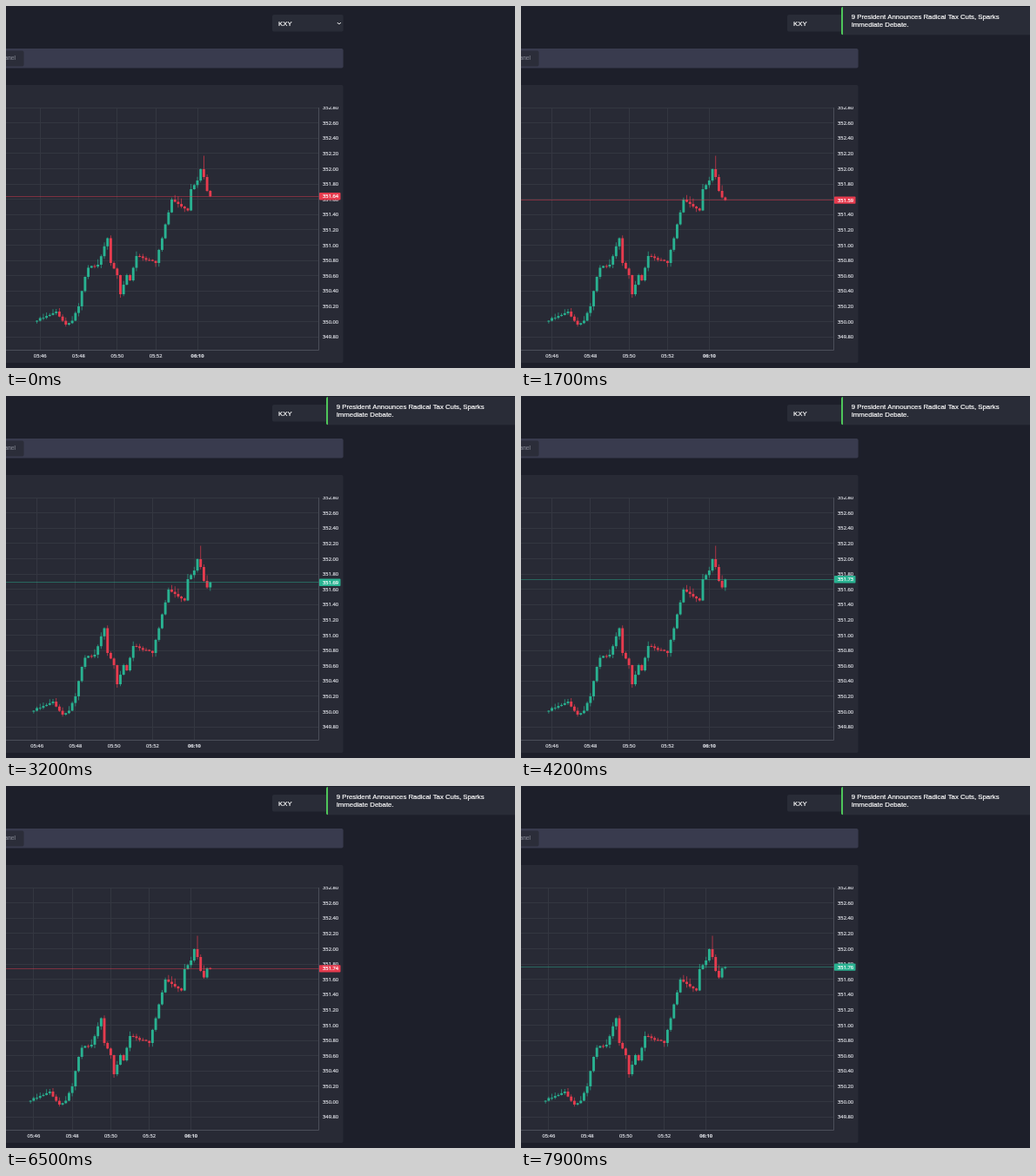
An HTML page with a canvas that plays this animation: 585 px wide and 417 px high, repeating every 8000 ms.

```html
<!DOCTYPE html>
<html lang="en">
<head>
<meta charset="utf-8">
<title>Market chart</title>
<style>
html, body { margin: 0; width: 100%; height: 100%; overflow: hidden; background: #1d1f2a; }
canvas { display: block; width: 585px; height: 417px; }
</style>
</head>
<body>
<canvas id="stage" width="585" height="417"></canvas>
<script>
const ctx = document.getElementById('stage').getContext('2d');
const LOOP = 8000;
const UP = '#29b291', DOWN = '#e63b4e', PANEL = '#292c37';
const GRID = '#343741', BORDER = '#4b4e59', LABEL = '#dcdee4';
const AXIS_FONT = '5.8px "Open Sans", "Noto Sans", sans-serif';
const UI_FONT = '7.8px "Liberation Sans", Arial, sans-serif';
const PLOT = { right: 359.5, top: 117, bottom: 396.5 };
const GAP = 3.69, LAST_X = 234.8;

// Turning points of the price curve: candle index and closing height.
const turns = [
  [-1, 363.5], [6, 352], [9, 367], [11, 362.5], [13, 346], [15, 312], [16, 301.5],
  [19, 298], [22, 267.5], [23, 296], [25, 310], [26, 332], [28, 310], [29, 316],
  [31, 288], [37, 296], [42, 223], [47, 235.5], [48, 211], [50, 201], [51, 188],
  [52, 197], [53, 213], [54, 220.5], [55, 209.8]
];
const PEAK = 52;

const quotes = [
  { at: 0, price: 351.64, i: 54 },
  { at: 600, price: 351.59, i: 55 },
  { at: 2400, price: 351.69, i: 55 },
  { at: 3700, price: 351.73, i: 55 },
  { at: 6000, price: 351.74, i: 56 },
  { at: 7200, price: 351.76, i: 56 }
];

const yOf = price => 363.5 - (price - 350) * 88;

function noise(i, seed) {
  const v = Math.sin(i * 127.1 + seed * 311.7) * 43758.5;
  return v - Math.floor(v);
}

function closeAt(i) {
  const k = turns.findIndex(turn => turn[0] >= i);
  const [i1, y1] = turns[k];
  if (i === i1) return y1;
  const [i0, y0] = turns[k - 1];
  return y0 + (y1 - y0) * (i - i0) / (i1 - i0) + (noise(i, 1) - 0.5) * 2;
}

function finishedCandle(i) {
  const open = closeAt(i - 1), close = closeAt(i);
  const wick = i === PEAK ? 15.5 : 0.5 + 6 * noise(i, 2) ** 2;
  return {
    open, close,
    high: Math.min(open, close) - wick,
    low: Math.max(open, close) + 0.5 + 4 * noise(i, 3) ** 2
  };
}

function liveCandle(seen) {
  const { i, price } = seen[seen.length - 1];
  const open = closeAt(i - 1);
  const path = [open, ...seen.filter(q => q.i === i).map(q => yOf(q.price))];
  return { open, close: yOf(price), high: Math.min(...path) - 1, low: Math.max(...path) + 1 };
}

function box(x, y, w, h, color, r = 0) {
  ctx.fillStyle = color;
  ctx.beginPath();
  ctx.roundRect(x, y, w, h, r);
  ctx.fill();
}

// A hairline outline gives small type a fuller weight.
function text(str, x, y, font, color, align = 'left') {
  ctx.font = font;
  ctx.fillStyle = ctx.strokeStyle = color;
  ctx.lineWidth = 0.2;
  ctx.textAlign = align;
  ctx.fillText(str, x, y);
  ctx.strokeText(str, x, y);
}

function line(x1, y1, x2, y2, color) {
  ctx.strokeStyle = color;
  ctx.lineWidth = 1;
  ctx.beginPath();
  ctx.moveTo(x1, y1);
  ctx.lineTo(x2, y2);
  ctx.stroke();
}

function drawPage() {
  box(0, 0, 585, 417, '#1d1f2a');
  box(306, 10, 81.7, 19.5, PANEL, 2);
  text('KXY', 313, 22.7, UI_FONT, '#fff');
  line(380.8, 19, 382.8, 21, '#fff');
  line(382.8, 21, 384.8, 19, '#fff');
  box(-5, 49, 392.6, 22.5, '#393b4e', 2);
  box(-5, 51.5, 25.5, 18, '#2b2d39', 2);
  text('Panel', 11, 62.3, UI_FONT.replace('7.8', '6.6'), '#777a86', 'right');
  box(-5, 91, 392.6, 320, '#282a35', 2);
}

function drawAxes(last) {
  for (let k = 0; k < 5; k++) {
    const latest = k === 4;
    const exact = LAST_X - (last - (latest ? 50 : 1 + k * 12)) * GAP;
    const x = Math.floor(exact) + 0.5;
    line(x, PLOT.top, x, PLOT.bottom, GRID);
    if (latest) text('06:10', exact, 405.3, 'bold ' + AXIS_FONT, LABEL, 'center');
    else text('05:' + (46 + k * 2), exact, 405.3, AXIS_FONT, LABEL, 'center');
  }

  ctx.save();
  ctx.beginPath();
  ctx.rect(0, PLOT.top - 1, 388, 290);
  ctx.clip();
  for (let k = 0; k <= 15; k++) {
    const price = 349.8 + k * 0.2;
    const y = yOf(price), row = Math.floor(y) + 0.5;
    line(0, row, PLOT.right, row, GRID);
    text(price.toFixed(2), 364, y + 2.1, AXIS_FONT, LABEL);
  }
  ctx.restore();
  line(PLOT.right, PLOT.top, PLOT.right, PLOT.bottom, BORDER);
  line(0, PLOT.bottom, PLOT.right, PLOT.bottom, BORDER);
}

const colorOf = candle => candle.close <= candle.open ? UP : DOWN;

function drawCandle(candle, x) {
  const { open, close, high, low } = candle;
  const color = colorOf(candle);
  ctx.globalAlpha = 0.75;
  box(x - 0.45, high, 0.9, low - high, color);
  ctx.globalAlpha = 1;
  box(x - 1.45, Math.min(open, close), 2.9, Math.max(1, Math.abs(open - close)), color);
}

function drawPrices(seen) {
  const { i: last, price } = seen[seen.length - 1];
  for (let i = 0; i < last; i++) {
    drawCandle(finishedCandle(i), LAST_X - (last - i) * GAP);
  }
  const live = liveCandle(seen);
  drawCandle(live, LAST_X);

  const row = Math.floor(live.close) + 0.5;
  ctx.globalAlpha = 0.45;
  line(0, row, PLOT.right, row, colorOf(live));
  ctx.globalAlpha = 1;
  box(360, live.close - 4.2, 24.5, 8.4, colorOf(live), 0.8);
  text(price.toFixed(2), 364, live.close + 2.1, AXIS_FONT, '#fff');
}

function drawToast(t) {
  const p = Math.min(1, Math.max(0, (t - 200) / 500));
  if (p === 0) return;
  const x = 368 + 217 * (1 - p) ** 3;
  box(x, 1, 225, 32.3, PANEL, 2);
  box(x, 1, 2, 32.3, '#4fc65b', [2, 0, 0, 2]);
  text('9 President Announces Radical Tax Cuts, Sparks', x + 11.7, 15.2, UI_FONT, '#fff');
  text('Immediate Debate.', x + 11.7, 24.1, UI_FONT, '#fff');
}

const start = performance.now();

function frame() {
  const t = Math.floor(((performance.now() - start) % LOOP) / 100) * 100;
  const seen = quotes.filter(q => q.at <= t);
  drawPage();
  drawAxes(seen[seen.length - 1].i);
  drawPrices(seen);
  drawToast(t);
  requestAnimationFrame(frame);
}
frame();
</script>
</body>
</html>
```
